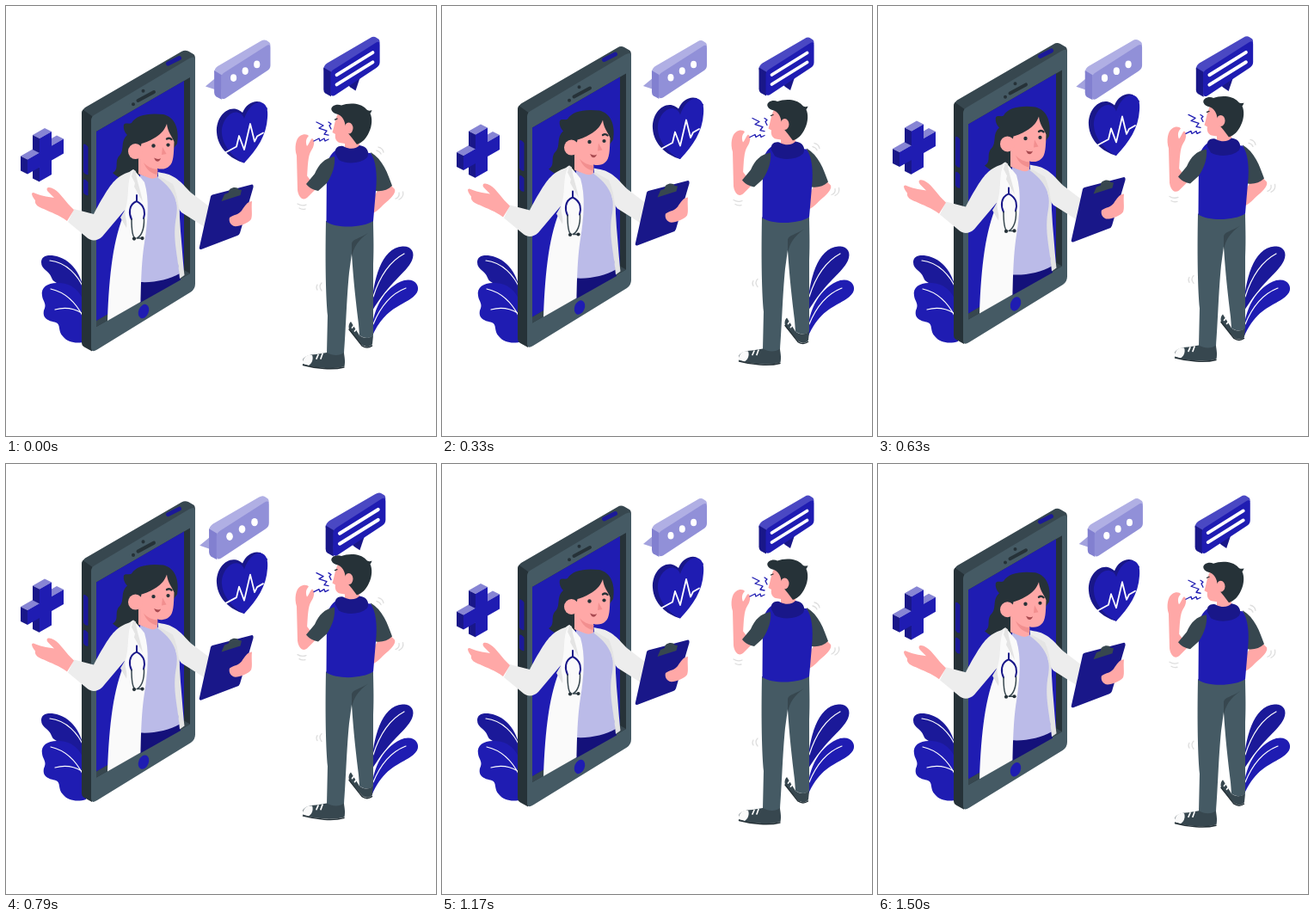
Recreate the animation shown at these times as an HTML page. Size 500 by 500 pixels, loop 1540 ms.

```html
<!DOCTYPE html>
<html lang="en">
<head>
<meta charset="utf-8">
<title>Online doctor</title>
<style>
  html, body { margin: 0; height: 100%; overflow: hidden; background: #fff; }
  svg { display: block; width: 100%; height: 100%; }
  .blue { fill: #1f1cb2; }
  .navy { fill: #191789; }
  .leaf { fill: #1b1999; }
  .ink { fill: #263238; }
  .slate { fill: #37474f; }
  .steel { fill: #455a64; }
  .skin { fill: #ffa8a7; }
  .blush { fill: #f28f8f; }
  .coat { fill: #fafafa; }
  .sleeve { fill: #ededed; }
  .shade { fill: #e4e4e4; }
  .white { fill: #fff; }
  .line { fill: none; stroke-linecap: round; stroke-linejoin: round; }
  .vein { stroke: #fff; stroke-width: 1.2; }
  .mark { stroke: #dedede; stroke-width: 1.3; }
  .pale { --top: #b0afe4; --side: #8280d0; --front: #9190d8; }
  .deep { --top: #4a48c3; --side: #191789; --front: #1f1cb2; }
</style>
</head>
<body>
<svg viewBox="0 0 500 500">
  <defs>
    <g id="slab">
      <path fill="var(--top)" d="M244 77Q244 73 248 70L297 41.500Q301 39 304 41L307 43Q308 44 308 47L256 106Z"/>
      <path fill="var(--side)" d="M244 75L252.500 80V108L246 104.500Q244 103 244 100Z"/>
      <path fill="var(--front)" d="M252 83Q252 79.500 256 77L303 47Q308 44 308 49V69Q308 73 304 75.500L257 106.500Q252 109 252 104Z"/>
    </g>
  </defs>

  <g id="plants">
    <path class="leaf" d="M92 345C92 322 82 299 62 292C50 288 41 290 41 298C41 307 50 307 53 316C56 325 70 322 92 345Z"/>
    <path class="blue" d="M93 356C92 336 78 322 62 322C50 321 40 326 42 337C43 344 48 346 44 354C42 364 50 366 58 368C64 370 60 378 66 384C72 392 84 393 93 390Z"/>
    <path class="leaf" d="M425 350C427 320 436 281 461 279.500C472 279 476 287 472 296C465 311 446 320 425 356Z"/>
    <path class="blue" d="M425 386C424 355 440 326 463 319C475 316 482 325 478 333C468 349 442 345 425 386Z"/>
    <path class="line vein" d="M51 296C70 298 84 313 91 330M52 329C70 333 82 346 90 362M57 353C68 350 78 351 88 357M463 288C446 297 434 316 427 338M465 328C449 334 436 348 427 370"/>
  </g>

  <g id="float">
    <g id="phone">
      <path class="slate" d="M88 126Q88 121 92 118L204 53Q208 50.500 212 52.500L218 56Q220 57 220 62L103 400L88 391Z"/>
      <path class="ink" d="M88 125Q88 122 89.500 120.500L100 128V401.500L91 396.500Q88 395 88 391Z"/>
      <path class="steel" d="M99 133Q99 129 103 126.500L213 61Q220 57 220 63V323Q220 329 215 332.500L106 399.500Q99 404 99 397Z"/>
      <path class="ink" d="M105 146L214 83V311L105 373Z"/>
      <path class="slate" d="M105 366L207 307L214 311L105 373Z"/>
      <path class="blue" d="M105 146L207 87V307L105 366Z"/>
      <path class="leaf" d="M90 161Q92 159 95.500 164V196Q92 197 90 193ZM90 202Q92 200 95.500 205V220Q92 221 90 217Z"/>
      <path class="line" stroke="#1b1999" stroke-width="5" d="M188.500 67L201.500 60.500"/>
      <path class="line" stroke="#263238" stroke-width="4" d="M153.500 110L172 100M148 114.200v.1M159.500 98.700v.1"/>
      <ellipse class="blue" cx="160" cy="355" rx="5.800" ry="8.500" transform="rotate(22 160 355)"/>
    </g>

    <g id="doctor">
      <path class="ink" d="M137 138C139 135 143 138 146 136C151 127 165 124 183 126C196 129 202 143 199 160L190 172L160 190L152 200C142 205 130 200 124 194C132 190 126 182 131 175C139 168 132 158 141 150C138 147 136 142 137 138Z"/>
      <path class="skin" d="M157.500 160C168 157 183 150 187 137C188 147 193 151 195.500 158C195 172 195 182 190 186C186 190 181 190 176 189V206L154 195V178Z"/>
      <ellipse class="skin" cx="150.500" cy="169" rx="8.500" ry="9"/>
      <path class="blush" d="M176.500 190C170 189.500 164 187 160 182C163 190 169 195 176 196ZM182 164L186.500 172L181 173Z"/>
      <circle class="ink" cx="171.500" cy="162.500" r="2.200"/>
      <circle class="ink" cx="188.500" cy="161.500" r="2.100"/>
      <path class="line" stroke="#263238" stroke-width="2.400" d="M187 154.500Q190 152.500 192.500 155"/>
      <path d="M172 176.500Q177 179 180 177Q178 182.500 174 180Z" fill="#a84a50"/>

      <path fill="#14117a" d="M156 319L203 308V318.500L156 345Z"/>
      <path fill="#bbbbe8" d="M156 196L164 199Q172 203 177 198L192 204C200 215 202 226 202 240C202 260 197 285 202 311C190 318 172 322 156 321Z"/>
      <path class="sleeve" d="M181 194C198 196 206 208 215 217L238 234.500L231 257L204 240C199 234 197 226 197 222C193 212 187 203 177 199L176.500 193Z"/>
      <path class="shade" d="M177 197L194 207C201 222 202 243 203 262C205 285 206 300 207.500 313L202 317C200 290 193 270 198 245C202 225 192 211 177 200Z"/>
      <path class="coat" d="M148 190C138 194 134 212 138 240C125 270 120 310 118 366L156.500 344C157 330 157 300 161 275C165 250 167 225 161 205C157 200 153 195 148 190Z"/>
      <path class="sleeve" d="M147 192C130 196 124 205 116 217C108 230 104 238 102 242L79 236L72 251L95 270C100 274 107 273 112 268L139 236C144 220 140 202 147 192Z"/>
      <path class="shade" d="M148 190L146 198L150 206L149 210L159 228C157 215 151 201 151 192ZM139 236L133 246L140 258C142 251 137 244 139 236Z"/>
      <path class="line" stroke="#191789" stroke-width="2" d="M152 220V227C142 231 143 242 146 248M152 227C162 232 162 241 160 247"/>
      <path class="line" stroke="#37474f" stroke-width="1.500" d="M146 248C146 262 147 268 150 270M160.500 247C161 260 157 268 152 270L158 270"/>
      <circle class="ink" cx="149" cy="270.500" r="2.100"/>
      <circle class="ink" cx="158.500" cy="270" r="2.100"/>
      <path class="skin" d="M79 237C69 228 64 218 56 213C50 209 45 211 49 216L56 223C48 222 38 220 32 217C28 217 31 222 34 226C33 231 38 234 44 236C52 240 62 243 71 250Z"/>
      <path class="navy" d="M238 221.500Q238.500 220 240 219.500L286 207.500Q288 207.500 287.500 211L272 264Q271 266.500 269 267L227 283Q224 283.500 225 280Z"/>
      <path class="slate" d="M250.500 227L254 219L259 217C258 211 269 209 270.500 213.500L274 214L272.500 220Z"/>
      <path class="skin" d="M260 246C266 242 270 243 274 238C278 232 280 228 286 227C285 236 287 243 285 248C281 253 270 257 265 256C260 254 259 249 260 246Z"/>
    </g>

    <g id="cross">
      <path fill="#8785d4" d="M39 154l14-8-8-4-14 8zM53 162.500l14-8-8-4-14 8zM25 178.500l14-8-8-4-14 8z"/>
      <path class="navy" d="M39 154l-8-4v17l8 4zM25 178.500l-8-4v17l8 4zM39 187.500l-8-4v17l8 4z"/>
      <path class="blue" d="M39 154l14-8v16.500l14-8v17l-14 8v16.500l-14 8v-16.500l-14 8v-17l14-8z"/>
    </g>

    <g id="heart">
      <path class="navy" d="M277 182.500C261 178 246 165 245 147C244 130 256 117 268 120C271 121 273 122 275 124C279 114 288 109 296 111.500L304 119Z"/>
      <path class="blue" d="M277 182.500C264 176 252 163 251 148C250 134 261 121 270 124C274 125 276 128 277 131C281 119 288 112 296 112C303 113 305 121 304 130C303 150 292 167 277 182.500Z"/>
      <path class="line" stroke="#fff" stroke-width="1.800" d="M255 170.500L268 163.500L271 151L277 167L284 137L289 157.500L292 151.500L299 147.500"/>
    </g>

    <g id="patient">
      <path class="skin" d="M349 196L361 212L350 223C345 227 340 222 339 214L338 174C335 165 337 154 342 151C346 148 351 149 352 151C349 154 348 158 350 163C352 161 354 155 356 154C360 156 358 164 355 168C351 174 351 185 350 200Z"/>
      <path class="skin" d="M446 207L452 213C454 218 446 225 440 230C435 235 430 240 426 241V225L433 213Z"/>
      <path class="skin" d="M386 125C382 133 382 140 379.500 147L383 149C382 153 384 158 388 159L394 160V172H411V158L402 136Z"/>
      <path class="ink" d="M378.500 121C377 116 385 113 390 115.500C398 112.500 412 112 419 120C421 122.500 424 121.500 425.500 121C425 123 424 124 423.500 125C426 130 426 139 422 147C419 154 414 159 408 161L402 153L394.500 144C395 136 393 129 386 126C382 125 380 124 378.500 121Z"/>
      <ellipse class="skin" cx="398.500" cy="142" rx="5" ry="6.500"/>
      <path class="line" stroke="#263238" stroke-width="1.300" d="M382.500 132L385 131"/>
      <path class="slate" d="M424 170C438 178 444 195 449 209C444 214 437 216 430 215Z"/>
      <path class="steel" d="M372 250C371 300 372 340 374 360L373 404C378 408 388 408 393 404C395 380 396 340 399 310L402 288C404 320 407 345 410 370L411 383C417 387 423 387 427 383L427 300C428 280 427 260 427 250Z"/>
      <path class="slate" d="M421 264C412 270 403 271 402 276V292C404 280 410 272 421 264Z"/>
      <path class="blue" d="M383 168C378 172 374 178 373 185L372.500 251C385 259 415 258 427 250L430 215C432 195 430 180 424 171Z"/>
      <path class="navy" d="M383 172C381 163 390 161 394 164C400 167 408 166 411 162C420 163 423 170 420 176C412 184 395 184 387 179Z"/>
      <path class="slate" d="M382 175C370 177 364 184 359 195L349 207C353 212 358 214 363 215L373 206C380 195 383 185 382 175Z"/>
      <path class="slate" d="M373 403L361 405C352 405 346 408 345 412V417C360 421 380 423 393.500 419C395 412 393 406 393 403C388 407 380 407 373 403ZM411 383L401 367C397 371 398 377 403 381L414 394C418 397 424 397 426 393L427 383C422 387 416 387 411 383Z"/>
      <path class="coat" d="M345 413C347 407 351 405 356 406C358 411 355 416 352 418L345 416Z"/>
      <path class="line" stroke="#263238" stroke-width="1.500" d="M345.500 417.500C360 421.500 380 423.500 393 420M399 376L414 395Q420 399 425.500 395"/>
      <path class="line" stroke="#fff" stroke-width="1.700" d="M363 405.500L361 410M368 404.500L366 410M405 371L402.500 374M408 375L405.500 378"/>
      <path class="line" stroke="#1f1cb2" stroke-width="1.300" d="M361 135l8 4-5 3 9 3-3 4 5 1M358 157l6-3 1 3 5-3 1 3 4-2M375 135l3 2-2 2 2 4"/>
      <path class="line mark" d="M339 230q5 3 10 1M341 235q3 2 7 1M433 164q5 1 6 6M431 168q4 1 5 4M453 224q5-2 4-7M457 225q6-3 4.500-9M367 322q-4 4 0 9M362 324q-2 3 0 6"/>
    </g>
  </g>

  <g id="bubbles">
    <g class="pale">
      <path fill="#a3a2de" d="M246 83L234 93L252 99Z"/>
      <use href="#slab"/>
      <g class="white">
        <ellipse cx="266" cy="83.300" rx="3.500" ry="4.300"/>
        <ellipse cx="279.300" cy="75.500" rx="3.500" ry="4.300"/>
        <ellipse cx="292.600" cy="68" rx="3.500" ry="4.300"/>
      </g>
    </g>
    <g class="deep">
      <path class="navy" d="M397 92L410 83L405 98L399 94Z"/>
      <use href="#slab" x="124.500" y="-3.500"/>
      <path class="line" stroke="#fff" stroke-width="3.800" d="M383.500 80L424.500 54.500M383.500 91L424.500 65.500"/>
    </g>
  </g>
</svg>
<script>
  const LOOP = 1540, BEAT = 400, TURN = 2 * Math.PI;
  const float = document.getElementById('float');
  const bubbles = document.getElementById('bubbles');

  // Smooth rise and fall from 0 to 1, starting at the given time.
  function beat(t, start) {
    const age = (t - start + LOOP) % LOOP;
    return age < BEAT ? (1 - Math.cos(TURN * age / BEAT)) / 2 : 0;
  }

  function draw(now) {
    const t = now % LOOP;
    const phase = TURN * (t + 70) / LOOP;
    // The third harmonic sharpens the turning points a little.
    const y = 4.3 * (Math.cos(phase) + 0.06 * Math.cos(3 * phase) - 0.99);
    const scale = 1 + 0.1 * (beat(t, -60) + beat(t, 548));
    float.setAttribute('transform', `translate(0 ${y})`);
    bubbles.setAttribute('transform', `translate(333 72) scale(${scale}) translate(-333 -72)`);
    requestAnimationFrame(draw);
  }
  draw(performance.now());
</script>
</body>
</html>
```
